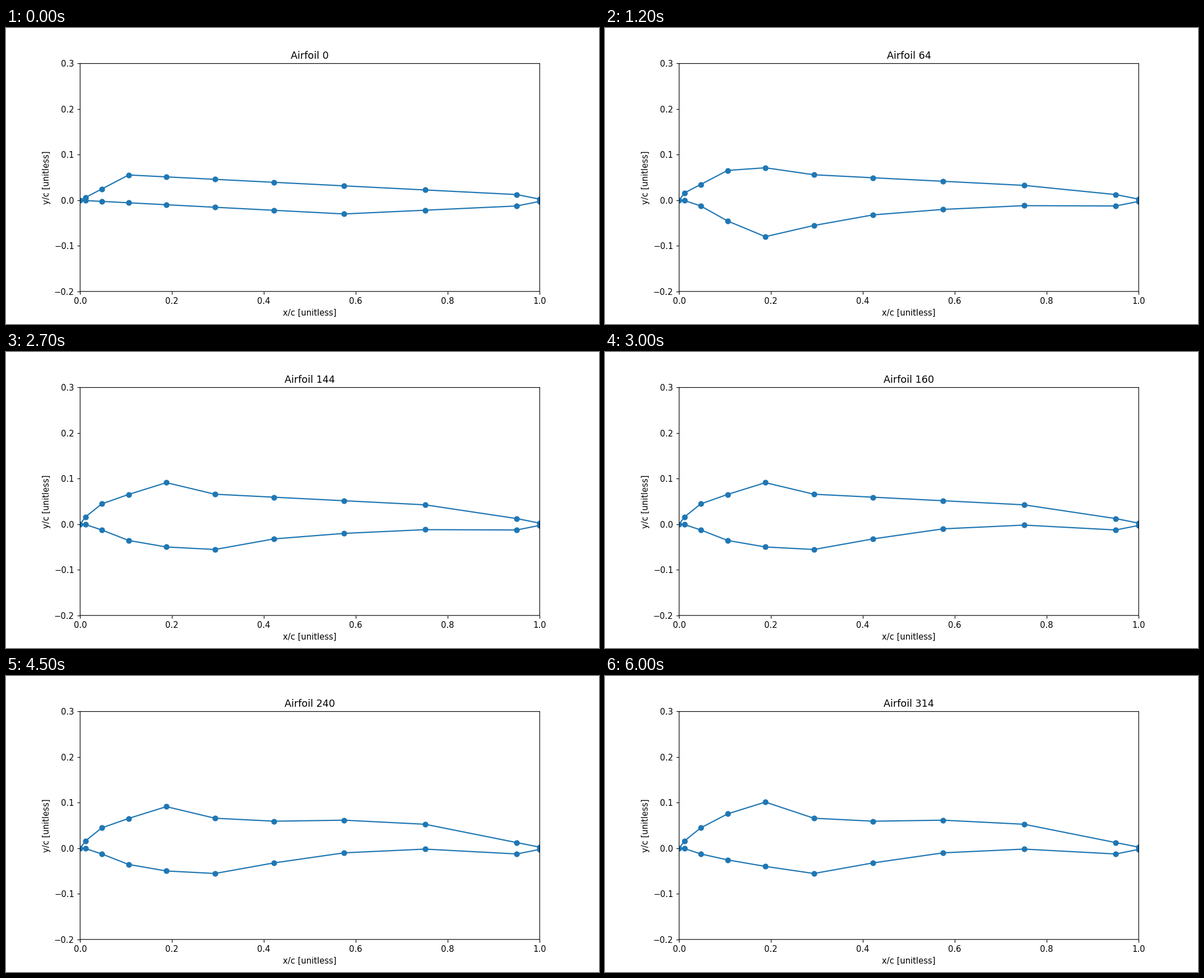
A matplotlib script that plays this animation: 1058x529 px, repeating every 6.3 s.

```python
import numpy as np
import matplotlib.pyplot as plt
from matplotlib.animation import FuncAnimation

FRAMES, INTERVAL = 21, 300
EVALS_PER_FRAME, LAST_EVAL = 16, 314
STEP = 0.01

# Stations spread quadratically along the chord, plus the trailing edge
x = np.append(0.95 * (np.arange(10) / 9) ** 2, 1.0)
upper_base = np.interp(x, [0, x[3], 0.95, 1], [0, 0.0555, 0.0125, 0.0025])
lower_base = np.interp(x, [0, x[7], 0.95, 1], [0, -0.03, -0.0125, -0.0025])

# Where the search takes stations 1 to 8, in steps
stations = np.arange(1, 9)
upper_goal = np.array([1.44, 2.4, 1.6, 5, 2, 2, 3, 3])
lower_goal = np.array([0, -1, -2.7, -4, -3.7, -1, 1.9, 1.9])
bulge = np.exp(-(stations - 3.8) ** 2)


def whole_steps(level):
    return np.sign(level) * np.ceil(np.maximum(np.abs(level) - 0.45, 0))


def surface(base, level):
    y = base.copy()
    y[stations] += STEP * whole_steps(level)
    return y


def foil(frame):
    pace = np.interp(frame, [0, 1, 4, 9, 12, 17, 20],
                     [0, 0.32, 0.47, 0.75, 0.85, 0.87, 1])
    # Downward moves settle early, overshoot near the nose, then ease back
    low_pace = np.where(lower_goal < 0, min(1, 2.5 * pace), pace)
    dent = np.interp(frame, [2, 4, 7, 15, 18], [0, -2.8, 0, 0, 1])
    top = surface(upper_base, upper_goal * pace)
    bottom = surface(lower_base, lower_goal * low_pace + dent * bulge)
    return np.concatenate([top[::-1], bottom[1:]])


plt.rcParams["path.snap"] = False
fig, ax = plt.subplots(figsize=(10, 5), dpi=105.8)
outline, = ax.plot(np.concatenate([x[::-1], x[1:]]), foil(0), "o-",
                   color="tab:blue")
ax.set_xlim(0, 1)
ax.set_ylim(-0.2, 0.3)
ax.set_xlabel("x/c [unitless]")
ax.set_ylabel("y/c [unitless]")
title = ax.set_title("Airfoil 0")


def update(frame):
    outline.set_ydata(foil(frame))
    title.set_text(f"Airfoil {min(frame * EVALS_PER_FRAME, LAST_EVAL)}")
    return outline, title


anim = FuncAnimation(fig, update, frames=FRAMES, interval=INTERVAL,
                     init_func=lambda: update(0), repeat=True, repeat_delay=0)
plt.show()
```
